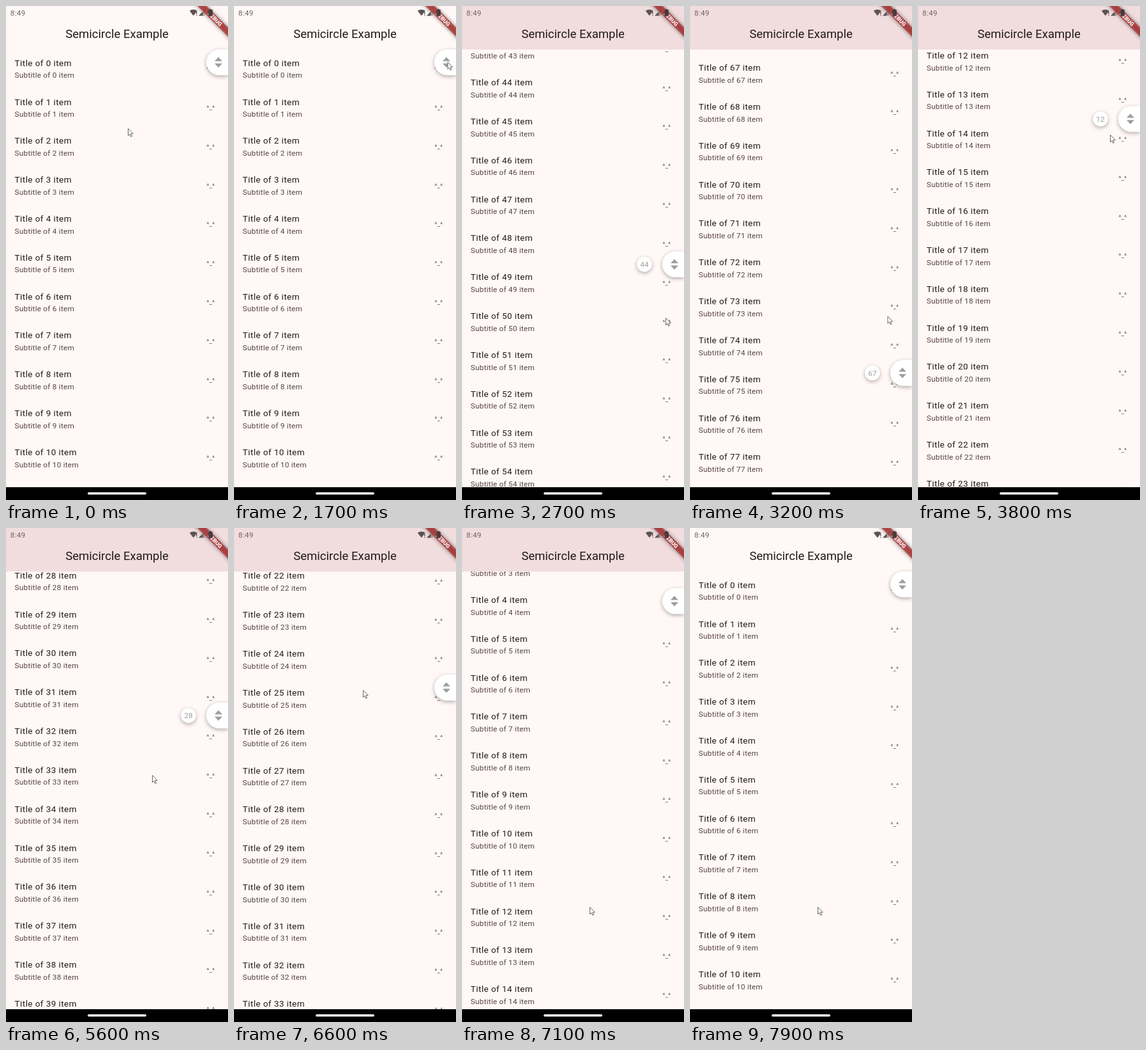
Animation, 348 px wide and 772 px high, one loop 8000 ms. Source, as an HTML page with a canvas:

```html
<!DOCTYPE html>
<html lang="en">
<head>
<meta charset="utf-8">
<title>Semicircle Example</title>
<style>
html, body { margin: 0; width: 100%; height: 100%; overflow: hidden; background: #fff8f6; }
canvas { display: block; width: 348px; height: 772px; }
</style>
</head>
<body>
<canvas id="stage"></canvas>
<script>
const W = 348, H = 772, LOOP = 8000, STEP = 100;
const LIST_TOP = 68, LIST_BOTTOM = 752, ROW = 60.82, ROWS = 100;
const THUMB_TOP = 88, THUMB_R = 20.3, SCROLL_RATIO = 8.38;
const DRAG_START = 2100, DRAG_END = 6500;

const canvas = document.getElementById('stage');
const dpr = window.devicePixelRatio || 1;
canvas.width = W * dpr;
canvas.height = H * dpr;
const ctx = canvas.getContext('2d');

// [time, x, y] of the pointer tip
const pointerKeys = [
  [0, 191, 191], [700, 191, 191], [1050, 262, 143], [1400, 336, 87], [1600, 336, 87],
  [1800, 333, 87], [2000, 333, 87], [2300, 330, 190], [2600, 322, 402.7], [2700, 319, 487],
  [2960, 313, 635], [3300, 308, 400], [3620, 302, 166], [3700, 301, 175.5], [3800, 301, 201],
  [4130, 291, 430], [4400, 283, 575], [4500, 281, 562.4], [4600, 278, 525], [4900, 264, 300],
  [5200, 247, 140], [5500, 234, 292], [5600, 229, 386], [5880, 222, 550], [6150, 210, 385],
  [6400, 203, 248.3], [6500, 202, 253], [6600, 202, 253], [6700, 202, 300], [6850, 201, 460],
  [7000, 200, 592], [8000, 200, 592]
];
// [time, scroll offset] once the thumb is released
const flingKeys = [
  [DRAG_END, 1352.3], [6600, 1352.3], [6700, 1300], [6850, 1080], [7000, 600], [7100, 220], [7200, 0]
];
// [time, overscroll stretch]
const stretchKeys = [[7200, 0], [7300, 0.022], [7400, 0.008], [7500, 0.004], [7700, 0]];

const clamp = (v, lo, hi) => Math.min(hi, Math.max(lo, v));
const ramp = (t, from, to) => clamp((t - from) / (to - from), 0, 1);

// Monotone cubic interpolation through one column of a key list.
function track(keys, t, col = 1) {
  const last = keys.length - 1;
  if (t <= keys[0][0]) return keys[0][col];
  if (t >= keys[last][0]) return keys[last][col];
  const slope = i => (keys[i + 1][col] - keys[i][col]) / (keys[i + 1][0] - keys[i][0]);
  const tangent = i => {
    if (i === 0 || i === last) return 0;
    const a = slope(i - 1), b = slope(i);
    return a * b <= 0 ? 0 : 2 * a * b / (a + b);
  };
  const i = keys.findIndex(k => k[0] > t) - 1;
  const span = keys[i + 1][0] - keys[i][0];
  const u = (t - keys[i][0]) / span, v = 1 - u;
  return v * v * (1 + 2 * u) * keys[i][col] + u * v * v * span * tangent(i) +
    u * u * (3 - 2 * u) * keys[i + 1][col] - u * u * v * span * tangent(i + 1);
}

function scrollAt(t) {
  if (t >= DRAG_END) return track(flingKeys, t);
  if (t < DRAG_START) return 0;
  const thumb = track(pointerKeys, t - 100, 2) + 1;
  return Math.max(0, (thumb - THUMB_TOP) * SCROLL_RATIO);
}

function text(str, x, y, size, color, spacing = 0, align = 'left', weight = 400) {
  ctx.font = `${weight} ${size}px Roboto, sans-serif`;
  ctx.letterSpacing = spacing + 'px';
  ctx.textAlign = align;
  ctx.fillStyle = color;
  ctx.fillText(str, x, y);
}

function polygon(points, color) {
  ctx.beginPath();
  points.forEach(([x, y]) => ctx.lineTo(x, y));
  ctx.closePath();
  ctx.fillStyle = color;
  ctx.fill();
}

function raised(path) {
  ctx.save();
  ctx.shadowColor = 'rgba(0,0,0,.32)';
  ctx.shadowBlur = 6 * dpr;
  ctx.shadowOffsetY = 2 * dpr;
  ctx.fillStyle = '#fff';
  ctx.beginPath();
  path();
  ctx.fill();
  ctx.restore();
}

function drawList(scroll, stretch) {
  ctx.save();
  ctx.beginPath();
  ctx.rect(0, LIST_TOP, W, LIST_BOTTOM - LIST_TOP);
  ctx.clip();
  ctx.translate(0, LIST_TOP);
  ctx.scale(1, 1 + stretch);
  const first = Math.max(0, Math.floor(scroll / ROW));
  const end = Math.min(ROWS, first + 13);
  for (let i = first; i < end; i++) {
    const y = i * ROW - scroll;
    text(`Title of ${i} item`, 13.6, y + 25.7, 13.52, '#231a1a', 0.42);
    text(`Subtitle of ${i} item`, 13.6, y + 44.3, 11.83, '#564344', 0.21);
    text('^_^', 314.4, y + 93.9 - ROW, 9.3, '#564344', 0.42);
  }
  ctx.restore();
}

function drawThumb(y) {
  const cx = 334.2, ax = 333;
  raised(() => {
    ctx.moveTo(W - 1.7, y - THUMB_R);
    ctx.lineTo(cx, y - THUMB_R);
    ctx.arc(cx, y, THUMB_R, -Math.PI / 2, Math.PI / 2, true);
    ctx.lineTo(W - 1.7, y + THUMB_R);
    ctx.arcTo(W, y + THUMB_R, W, y, 1.7);
    ctx.arcTo(W, y - THUMB_R, W - 1.7, y - THUMB_R, 1.7);
  });
  for (const dir of [-1, 1]) {
    polygon([[ax - 6, y + dir * 1.8], [ax + 6, y + dir * 1.8], [ax, y + dir * 8.2]], '#9e9e9e');
  }
}

function drawLabel(value, y, alpha) {
  if (alpha <= 0) return;
  ctx.save();
  ctx.globalAlpha = alpha;
  raised(() => ctx.arc(286, y, 11.8, 0, 7));
  text(value, 286.1, y + 4.2, 11.83, '#9e9e9e', 0.21, 'center');
  ctx.restore();
}

function drawBanner() {
  ctx.save();
  ctx.translate(W, 0);
  ctx.rotate(Math.PI / 4);
  ctx.shadowColor = 'rgba(0,0,0,.8)';
  ctx.shadowBlur = 6 * dpr;
  ctx.fillStyle = 'rgba(183,28,28,.627)';
  ctx.fillRect(-40, 23.7, 80, 10.1);
  ctx.shadowColor = 'transparent';
  text('DEBUG', 0, 31.8, 8.6, '#fff', 0, 'center', 900);
  ctx.restore();
}

function drawStatusBar() {
  const ink = '#5c5253';
  text('8:49', 6.8, 14.8, 11.8, '#6f6465', 0.2);
  ctx.beginPath();
  ctx.moveTo(293.8, 15.2);
  ctx.lineTo(287.8, 7.6);
  ctx.quadraticCurveTo(293.8, 3.2, 299.8, 7.6);
  ctx.closePath();
  ctx.fillStyle = ink;
  ctx.fill();
  ctx.fillRect(298.2, 9, 1.3, 4);
  ctx.fillRect(298.2, 14, 1.3, 1.3);
  polygon([[302, 15.2], [312, 15.2], [312, 5.2]], 'rgba(92,82,83,.4)');
  polygon([[302, 15.2], [308.5, 15.2], [308.5, 8.7]], ink);
  ctx.fillStyle = '#493b3c';
  ctx.fillRect(317.3, 6, 6.6, 9.6);
  ctx.fillRect(319.2, 4.8, 2.8, 1.4);
}

function drawPointer(x, y) {
  ctx.save();
  ctx.translate(x + 0.5, y + 0.6);
  polygon([[0, 0], [0, 11], [2.5, 8.7], [4.3, 12.7], [6, 12], [4.3, 8.1], [7.7, 7.9]], '#fff');
  ctx.strokeStyle = '#5a5557';
  ctx.lineWidth = 0.9;
  ctx.stroke();
  ctx.restore();
}

function draw(t) {
  const scroll = scrollAt(t);
  const thumbY = THUMB_TOP + scroll / SCROLL_RATIO;
  ctx.setTransform(dpr, 0, 0, dpr, 0, 0);
  ctx.fillStyle = '#fff8f6';
  ctx.fillRect(0, 0, W, H);

  drawList(scroll, track(stretchKeys, t));
  drawThumb(thumbY);
  const labelAlpha = ramp(t, DRAG_START - 100, DRAG_START + 100) * (1 - ramp(t, DRAG_END - 100, DRAG_END + 100));
  drawLabel(Math.round(scroll / ROW + 0.1), thumbY, labelAlpha);

  const tint = ramp(t, DRAG_START - 50, DRAG_START + 150) * (1 - ramp(t, 7150, 7350));
  ctx.fillStyle = `rgba(241,221,222,${tint})`;
  ctx.fillRect(0, 0, W, LIST_TOP);
  text('Semicircle Example', W / 2, 50.2, 18.58, '#231a1a', 0, 'center');
  drawBanner();
  drawStatusBar();

  ctx.fillStyle = '#000';
  ctx.fillRect(0, LIST_BOTTOM, W, H - LIST_BOTTOM);
  ctx.beginPath();
  ctx.roundRect(128, 760, 92, 3.6, 1.8);
  ctx.fillStyle = '#fff';
  ctx.fill();

  drawPointer(track(pointerKeys, t, 1), track(pointerKeys, t, 2));
}

const start = performance.now();
function tick() {
  const t = (performance.now() - start) % LOOP;
  draw(Math.floor(t / STEP) * STEP);
  requestAnimationFrame(tick);
}
tick();
</script>
</body>
</html>
```
